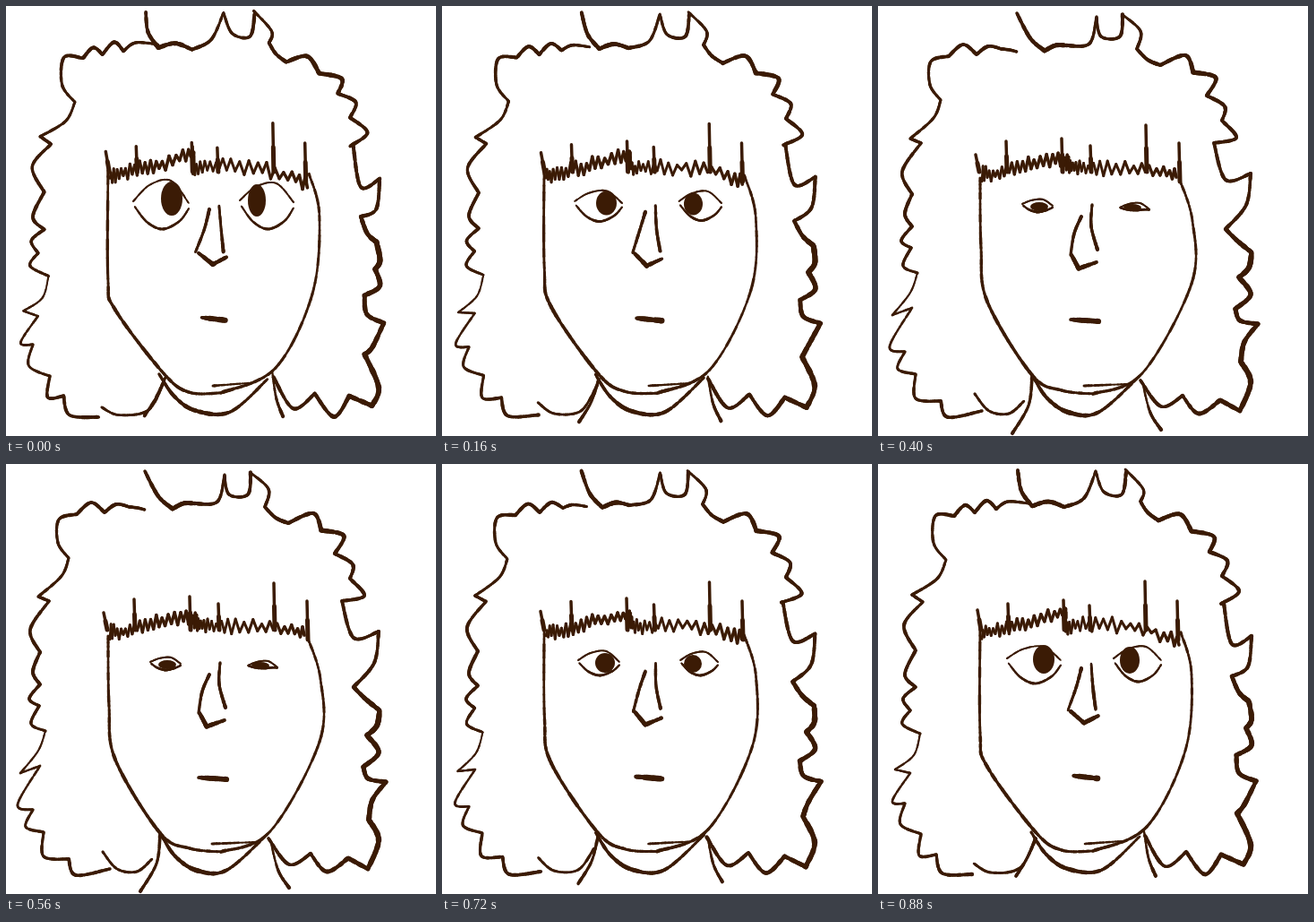
Recreate the animation shown at these times as an HTML page with a canvas. Size 480x480 px, loop 960 ms.

```html
<!DOCTYPE html>
<html lang="en">
<head>
<meta charset="utf-8">
<title>Blink</title>
<style>
html, body { margin: 0; width: 100%; height: 100%; overflow: hidden; background: #fff; }
canvas { display: block; }
</style>
</head>
<body>
<canvas id="stage" width="480" height="480"></canvas>
<script>
const INK = '#3b1b05', STEP = 80;
const ctx = document.getElementById('stage').getContext('2d');
const hash = n => { const v = Math.sin(n * 127.1) * 43758.5; return v - Math.floor(v); };
const mix = (a, b, t) => a + (b - a) * t;

// Points are "x,y"; "!" marks a sharp corner.
const parse = text => text.split(' ').map(s => {
  const [x, y] = s.split(',').map(parseFloat);
  return { x, y, corner: s.endsWith('!') };
});

// Each stroke has brush widths and two shapes: eyes open and eyes drowsy.
const strokes = [];
const makeStroke = (widths, open, drowsy) =>
  ({ widths, open: parse(open), drowsy: parse(drowsy) });
const add = (...args) => strokes.push(makeStroke(...args));

// Hair
add([4, 5, 3, 4],
  '156,7 160,30 172,47! 190,42 208,48! 230,38 243,8! 252,31 272,34 277,9',
  '155,8 170,36 186,50! 198,44 210,44! 236,42 244,12! 249,34 270,34 273,9');
add([3, 4, 4, 3],
  '168,44 145,42 132,50! 121,41 108,54! 97,46 85,58! 64,58 62,88 76,107!',
  '155,51 147,49 138,48! 123,45 110,54! 95,43 79,56! 59,62 58,88 70,105!');
add([3, 4, 3],
  '76,107 66,128 38,146! 50,154! 29,180 42,208! 30,235 42,249! 28,262 36,275! 27,290 47,301!',
  '70,105 62,125 36,148! 48,153! 27,185 38,210! 30,232 38,246! 26,262 37,270! 28,290 44,298!');
add([2, 3, 4],
  '47,301 40,325 19,341! 36,345! 16,376 30,379! 25,402 48,413! 46,437 65,436! 72,457 105,458',
  '44,298 36,320 16,345! 38,337! 13,380 30,386! 22,405 42,411! 42,438 70,441! 78,459 116,452');
add([3, 4, 5, 4, 4],
  '276,6 296,28 293,42! 301,54 313,63! 337,56 350,75! 375,81 370,98! 390,108 384,125! 403,142 383,156!',
  '272,9 293,28 289,48! 301,60 315,66! 343,55 352,74! 377,80 367,100! 387,112 384,128! 400,147 375,153!');
add([4, 4, 6, 5],
  '386,156 395,201 417,192! 413,226 395,237! 403,255 414,265! 417,285 411,295! 417,314 400,325!',
  '375,153 388,194 416,187! 411,222 388,249! 401,262 417,275! 414,292 403,303! 416,322 399,338!');
add([5, 5, 6, 5],
  '400,325 403,345 422,354! 409,380 401,390! 416,425 408,447! 383,436!',
  '399,338 404,351 424,355! 409,375 405,397! 416,420 404,452! 382,440!');
add([5, 4, 4],
  '383,436 365,458 344,433! 320,449 298,415',
  '382,440 358,455 340,435! 316,447 293,418');

// Neck
add([3, 3],
  '107,446 126,456 158,451 176,418',
  '108,433 124,452 146,455 163,441');
add([4, 3, 4], '176,418 166,441 154,460', '172,414 168,446 150,477');
add([2, 4], '297,410 302,440 310,460', '296,424 304,454 316,473');
add([3, 5, 3],
  '171,411 188,436 212,452 250,453 292,416',
  '172,412 189,438 214,454 247,453 293,412');

// Face
add([3, 4, 3],
  '114,180 114,300 122,338 176,411 205,431 240,432',
  '114,192 115,270 122,330 172,412 205,429 240,433');
add([4, 3, 3, 3],
  '240,432 300,405 343,320 350,235 338,188',
  '240,433 295,410 350,310 351,240 336,192');
add([3, 2], '231,424 272,421', '230,424 280,422');
add([4, 3], '227,228 221,250 212,275', '227,235 219,254 215,278');
add([3, 4], '238,223 240,250 243,274', '239,222 238,246 245,272');
add([4, 5, 4], '215,276! 230,289! 246,281!', '216,278! 224,293! 244,286!');
add([4, 6, 6], '218,348 245,351', '215,350 246,352');

const fringe = makeStroke([3, 4, 3, 4],
  '116,190 138,184 170,177 207,165 211,181 240,179 292,183 336,197',
  '116,187 138,186 170,175 205,172 218,180 245,181 295,182 333,188');
const spikes = makeStroke([3, 3, 4, 3],
  '111,163 145,156 207,152 236,158 298,131 334,153',
  '109,166 143,151 205,148 237,156 299,133 336,153');

// Eye: left, right, corner y, top, bottom, pupil x, y, rx, ry; from wide to drowsy.
const leftEye = [
  [142, 204, 218, 195, 249, 185, 215, 12, 19],
  [144, 204, 217, 204, 245, 185, 218, 12, 16],
  [152, 198, 219, 209, 236, 182, 222, 11, 11],
  [161, 195, 221, 216, 230, 180, 224, 10, 5]
];
const rightEye = [
  [261, 321, 217, 198, 249, 280, 217, 10, 18],
  [263, 316, 217, 204, 243, 281, 219, 11, 15],
  [266, 308, 219, 210, 236, 280, 223, 10, 10],
  [270, 303, 225, 220, 228, 284, 225, 10, 4]
];

// How far the lids have dropped in each drawing.
const LIDS = [0, 1, 1.5, 2, 2.5, 3, 3.4];

// Point and brush width at u (0..1), on a curve that breaks at corners.
function sample(points, widths, u) {
  const s = u * (points.length - 1), i = Math.min(Math.floor(s), points.length - 2), f = s - i;
  const b = points[i], c = points[i + 1];
  const a = b.corner || i === 0 ? b : points[i - 1];
  const d = c.corner || !points[i + 2] ? c : points[i + 2];
  const curve = k => b[k] + f / 2 * (c[k] - a[k]
    + f * (2 * a[k] - 5 * b[k] + 4 * c[k] - d[k] + f * (3 * (b[k] - c[k]) + d[k] - a[k])));
  const v = u * (widths.length - 1), j = Math.floor(v);
  return { x: curve('x'), y: curve('y'), w: mix(widths[j], widths[j + 1] ?? widths[j], v - j) };
}

const blend = ({ open, drowsy }, t) => open.map((p, i) => ({
  x: mix(p.x, drowsy[i].x, t), y: mix(p.y, drowsy[i].y, t), corner: p.corner
}));

function line(p, q, width) {
  ctx.lineWidth = width;
  ctx.beginPath();
  ctx.moveTo(p.x, p.y);
  ctx.lineTo(q.x, q.y);
  ctx.stroke();
}

function brush(points, widths) {
  const n = 14 * (points.length - 1);
  let last = sample(points, widths, 0);
  for (let i = 1; i <= n; i++) {
    const p = sample(points, widths, i / n);
    line(last, p, p.w * (0.8 + 0.3 * hash(i + p.x)));
    last = p;
  }
}

function drawFringe(t, seed) {
  const teeth = 76, points = blend(fringe, t);
  let last;
  for (let i = 0; i <= teeth; i++) {
    const p = sample(points, fringe.widths, i / teeth);
    p.y += (i % 2 ? -1 : 1) * (2 + 7 * hash(i + seed * 90));
    if (last) line(last, p, p.w * 0.9);
    last = p;
  }
  blend(spikes, t).forEach((tip, i, all) => {
    const root = { x: tip.x + (i ? 1 : 4), y: i === all.length - 1 ? 196 : 185 };
    const middle = { x: (tip.x + root.x) / 2, y: (tip.y + root.y) / 2 };
    line(tip, root, 3.5);
    line(middle, root, 5);
  });
}

function drawEye(stages, lid) {
  const i = Math.min(Math.floor(lid), 2);
  const [x0, x1, y, top, bottom, px, py, rx, ry] =
    stages[i].map((v, k) => mix(v, stages[i + 1][k], lid - i));
  const at = (f, y) => ({ x: mix(x0, x1, f), y });
  const sag = (bottom - y) * 0.2;
  brush([at(0, y), at(0.3, mix(y, top, 0.8)), at(0.68, top), at(1, y + 2)], [2, 2]);
  brush([at(0.03, y + sag), at(0.25, mix(y, bottom, 0.75)), at(0.53, bottom),
    at(0.83, mix(y, bottom, 0.72)), at(1, y + sag + 2)], [2, 3, 2]);
  ctx.beginPath();
  ctx.ellipse(px, py, rx, ry, 0, 0, 2 * Math.PI);
  ctx.fill();
}

function draw(index) {
  const lid = LIDS[index], t = Math.max(-0.15, (lid - 1) / 2);
  ctx.fillStyle = '#fff';
  ctx.fillRect(0, 0, 480, 480);
  ctx.fillStyle = ctx.strokeStyle = INK;
  ctx.lineCap = 'round';
  strokes.forEach(stroke => brush(blend(stroke, t), stroke.widths));
  drawFringe(t, index);
  drawEye(leftEye, lid);
  drawEye(rightEye, lid);
}

// The drawings play forward, then back.
function tick() {
  const step = Math.floor(performance.now() / STEP) % 12;
  draw(Math.min(step, 12 - step));
  requestAnimationFrame(tick);
}
tick();
</script>
</body>
</html>
```
